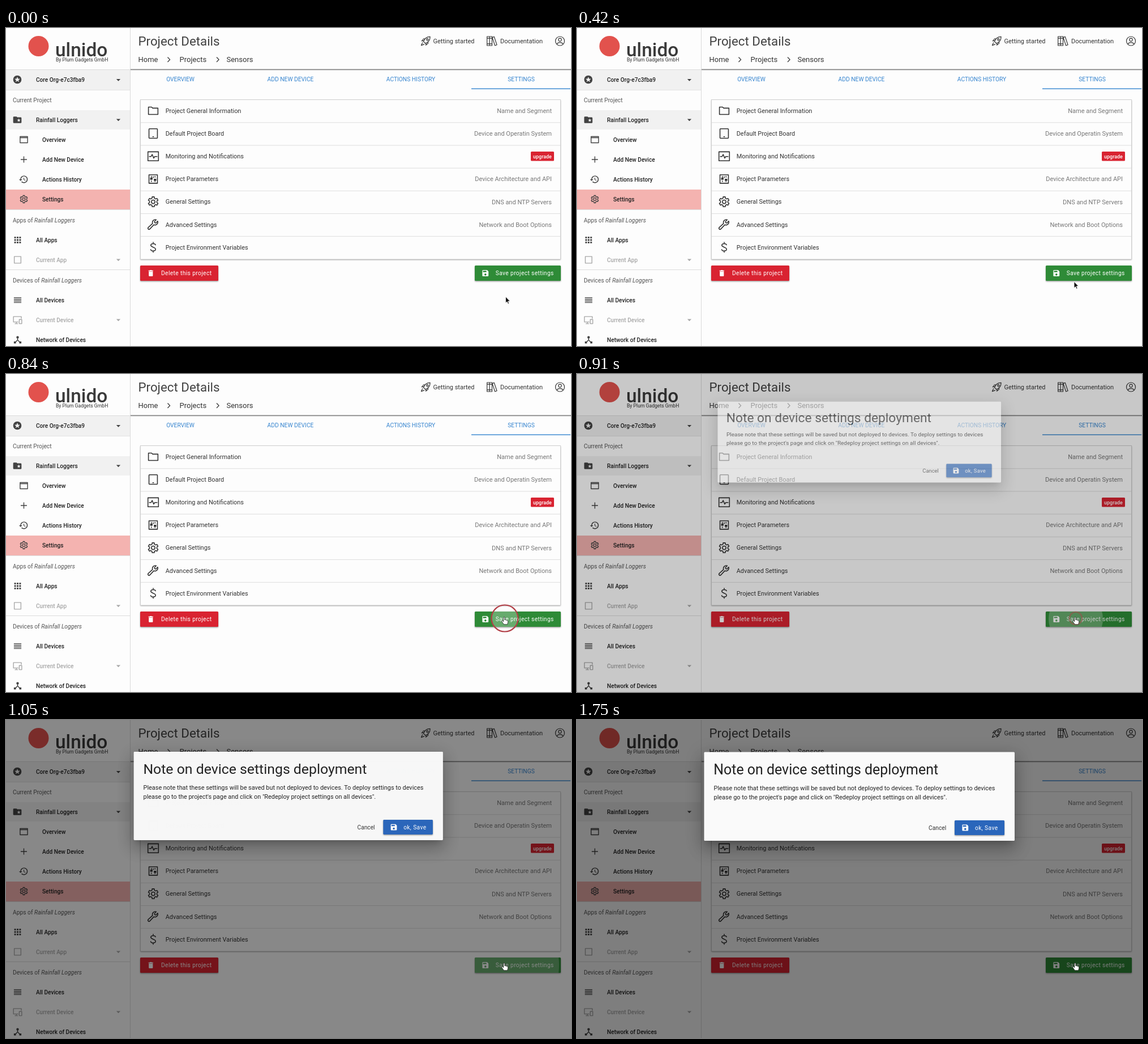
Write an HTML page that moves like this. It is 998 px wide and 561 px high and loops after 2170 ms.

```html
<!DOCTYPE html>
<html lang="en">
<head>
<meta charset="utf-8">
<title>Project settings</title>
<style>
html, body { margin: 0; width: 100%; height: 100%; overflow: hidden; background: #fdfdfd; }
svg { display: block; width: 100vw; height: 100vh; font-family: Roboto, sans-serif; }
</style>
</head>
<body>
<svg id="stage" viewBox="0 0 998 561"></svg>
<script>
const LOOP = 2170, STEP = 70, LAST = 1750;
const INK = '#424242', RED = '#d92331', GREEN = '#2e8b37', BLUE = '#2a66bb';

// y is the middle of the capitals
const text = (x, y, size, str, fill = '#212121', attrs = '') =>
  `<text x="${x}" y="${y + size * 0.355}" font-size="${size}" fill="${fill}" ${attrs}>${str}</text>`;
const rect = (x, y, w, h, fill, attrs = '') =>
  `<rect x="${x}" y="${y}" width="${w}" height="${h}" fill="${fill}" ${attrs}/>`;
const place = (x, y, k) => `transform="translate(${x} ${y}) scale(${k}) translate(-12 -12)"`;
const solid = (x, y, k, d, fill = INK) =>
  `<path ${place(x, y, k)} d="${d}" fill="${fill}" fill-rule="evenodd"/>`;
const line = (x, y, k, d, stroke = INK, w = 1.9) =>
  `<path ${place(x, y, k)} d="${d}" fill="none" stroke="${stroke}" stroke-width="${w}" stroke-linejoin="round"/>`;
const polar = (r, a, cx = 12, cy = 12) =>
  `${(cx + r * Math.sin(a)).toFixed(2)} ${(cy - r * Math.cos(a)).toFixed(2)}`;
const ring = (cx, cy, r) => `M${cx - r} ${cy}a${r} ${r} 0 1 0 ${2 * r} 0a${r} ${r} 0 1 0 ${-2 * r} 0z`;

function star(cx, cy, r) {
  const pts = [];
  for (let i = 0; i < 10; i++) pts.push(polar(i % 2 ? r * 0.42 : r, i * Math.PI / 5, cx, cy));
  return 'M' + pts.join('L') + 'z';
}

function gear() {
  const pts = [];
  for (let i = 0; i < 6; i++) {
    const a = i * Math.PI / 3;
    pts.push(polar(7.2, a - 0.31), polar(9.6, a - 0.21), polar(9.6, a + 0.21), polar(7.2, a + 0.31));
  }
  return 'M' + pts.join('L') + 'z' + ring(12, 12, 3.4);
}

function grid() {
  let d = '';
  for (let i = 0; i < 9; i++) d += `M${4 + i % 3 * 6} ${4 + Math.floor(i / 3) * 6}h4v4h-4z`;
  return d;
}

const ICON = {
  starCircle: ring(12, 12, 10) + star(12, 12.3, 7),
  folderStar: 'M10 4H4a2 2 0 0 0-2 2v12a2 2 0 0 0 2 2h16a2 2 0 0 0 2-2V8a2 2 0 0 0-2-2h-8z' + star(15.5, 13.2, 4.6),
  drop: 'M7 10l5 5 5-5z',
  web: 'M3 4.5h18v15H3zM3 7.2h18',
  plus: 'M12 4.5v15M4.5 12h15',
  history: 'M13 3a9 9 0 0 0-9 9H1l3.9 3.9L9 12H6a7 7 0 1 1 2.06 4.94l-1.42 1.42A9 9 0 1 0 13 3zm-1 5v5l4.3 2.5.7-1.2-3.5-2.1V8z',
  gear: gear(),
  grid: grid(),
  box: 'M4 4h16v16H4z',
  list: 'M3 6h18M3 10h18M3 14h18M3 18h18',
  screens: 'M21 9V4H2v13h12M5 21h8M9 17v4M16 11h6v10h-6z',
  hub: 'M17 16l-4-4V8.8a3 3 0 1 0-2 0V12l-4 4H3v5h5v-3l4-4.2 4 4.2v3h5v-5z',
  folder: 'M3 5h6l2 2h10v12H3z',
  tablet: 'M5 3h14a1 1 0 0 1 1 1v16a1 1 0 0 1-1 1H5a1 1 0 0 1-1-1V4a1 1 0 0 1 1-1zM10.5 18h3',
  pulse: 'M2 3.5h20v17H2zM4 12.5h4l2-4 3 7 2-3h5',
  sliders: 'M4 4h16v16H4zM8.5 6.5v5M8.5 15v2.5M7 10.5h3v2H7zM15.5 6.5V9M15.5 12v5.5M14 12.5h3v2h-3zM12 7v3',
  wrench: 'M20.5 5.5a5.5 5.5 0 0 1-7.3 6.9l-7.6 8.1a2 2 0 0 1-3-3l8.2-7.5a5.5 5.5 0 0 1 6.9-7.1l-3.3 3.4.5 2.2 2.2.5z',
  dollar: 'M12 2v3M12 19v3M16.5 8.2c0-4.2-9-4.2-9 0 0 4.3 9 3 9 7.5 0 4.3-9.3 4.3-9.3 0',
  rocket: 'M7 13C9 7 14 2.5 21.5 2.5 21.5 10 17 15 11 17zM8 11l-5 1 4-5h4M13 16l-1 5 5-4v-4M5 15l-3 6.5L9 19' + ring(15.5, 8.5, 2),
  books: 'M1 2h5.5v20H1zM6.5 2H12v20H6.5zM12.5 4l4.2-1.5 6 18-4.2 1.5zM1 6h11M1 18h11',
  person: ring(12, 12, 10) + ring(12, 9.3, 3.3) + 'M5.2 18.8c2-4.8 11.6-4.8 13.6 0',
  trash: 'M6 19a2 2 0 0 0 2 2h8a2 2 0 0 0 2-2V7H6zM19 4h-3.5l-1-1h-5l-1 1H5v2h14z',
  save: 'M17 3H5a2 2 0 0 0-2 2v14a2 2 0 0 0 2 2h14a2 2 0 0 0 2-2V7zM15 9H5V5h10z' + ring(12, 16, 3)
};

const MEDIUM = 'font-weight="500"', SPACED = 'letter-spacing=".37"';
const rule = (x, y, w, fill = '#dcdcdc', h = 1) => rect(x, y, w, h, fill);

function sidebar() {
  const item = (x, y, str, fill) => text(x, y, 10.15, str, fill, MEDIUM);
  const label = (y, str) => text(12, y, 10.28, str, '#555');
  const pale = '#a8a8a8', k = 0.733, group = 'Rainfall Loggers';
  return rect(0, 74, 219, 35, '#f1f1f1') + rect(0, 145, 219, 34, '#f1f1f1') +
    rect(0, 285, 219, 35, '#f4b3b0') +
    rule(0, 73, 219) + rule(0, 109, 219, '#e2e2e2') + rule(0, 320, 219) + rule(0, 426, 219) +
    rect(219, 0, 1, 561, '#dadada') +
    `<circle cx="57.5" cy="32" r="18" fill="#e2524d"/>` +
    text(87, 38.5, 33.5, 'ulnido', '#3a3a3a', MEDIUM) +
    text(88, 56, 8.65, 'By Plum Gadgets GmbH', '#333') +
    solid(20, 91, k, ICON.starCircle) + item(53, 91, 'Core Org-e7c3fba9') + solid(198.5, 91.5, k, ICON.drop) +
    label(127, 'Current Project') +
    solid(20, 162, k, ICON.folderStar) + item(53, 162, group) + solid(198.5, 162, k, ICON.drop) +
    line(31.5, 197, k, ICON.web) + item(64, 197, 'Overview') +
    line(31.5, 232, k, ICON.plus) + item(64, 232, 'Add New Device') +
    solid(31, 267, k, ICON.history) + item(64, 267, 'Actions History') +
    line(31.5, 302, 0.69, ICON.gear) + item(64, 302, 'Settings') +
    label(339, `Apps of <tspan font-style="italic">${group}</tspan>`) +
    solid(20.5, 374, k, ICON.grid) + item(53, 374, 'All Apps') +
    line(20.5, 409, k, ICON.box, pale) + item(53, 409, 'Current App', pale) + solid(198.5, 409, k, ICON.drop, pale) +
    label(445, `Devices of <tspan font-style="italic">${group}</tspan>`) +
    line(20.5, 480, k, ICON.list) + item(53, 480, 'All Devices') +
    line(20.5, 515, k, ICON.screens, pale) + item(53, 515, 'Current Device', pale) + solid(198.5, 515, k, ICON.drop, pale) +
    solid(20.5, 550, k, ICON.hub) + item(53, 550, 'Network of Devices');
}

function header() {
  const tab = (x, str) => text(x, 90.5, 10.26, str, '#3584cf', 'text-anchor="middle"');
  const chevron = x => `<path d="M${x - 2} 51.5l4 4.2-4 4.2" fill="none" stroke="#444" stroke-width="1.4"/>`;
  return text(233.5, 23, 22.3, 'Project Details', INK) +
    text(233.5, 55, 13, 'Home', '#333') + chevron(287.5) +
    text(306.5, 55, 13, 'Projects', '#333') + chevron(374) +
    text(389.5, 55, 13, 'Sensors', '#333') +
    line(741.5, 23, 0.8, ICON.rocket, '#333', 1.5) + text(754.5, 23, 11, 'Getting started', '#333') +
    line(858.5, 23, 0.8, ICON.books, '#333', 1.5) + text(873, 23, 11, 'Documentation', '#333') +
    line(978.5, 23, 0.8, ICON.person, '#333', 1.5) +
    rule(220, 72.5, 778, '#858585', 1.5) + rule(220, 74, 778, '#e0e0e0') +
    tab(308, 'OVERVIEW') + tab(502.5, 'ADD NEW DEVICE') + tab(715, 'ACTIONS HISTORY') + tab(910, 'SETTINGS') +
    rule(822, 106.5, 175, '#3584cf', 1.4);
}

function card() {
  const rows = [
    ['folder', 'Project General Information', 'Name and Segment'],
    ['tablet', 'Default Project Board', 'Device and Operatin System'],
    ['pulse', 'Monitoring and Notifications', ''],
    ['sliders', 'Project Parameters', 'Device Architecture and API'],
    ['gear', 'General Settings', 'DNS and NTP Servers'],
    ['wrench', 'Advanced Settings', 'Network and Boot Options'],
    ['dollar', 'Project Environment Variables', '']
  ];
  let out = rect(237.5, 127.5, 742, 281.5, '#000', 'opacity=".4" filter="url(#soft)"') +
    rect(237.5, 126.5, 742, 281.5, '#fdfdfd', 'stroke="#c8c8c8" stroke-width=".8"');
  rows.forEach(([icon, left, right], i) => {
    const y = 146 + i * 40.15;
    if (i) out += rule(238, y - 19.8, 741, '#dedede');
    out += line(260, y, 0.93, ICON[icon], '#333', 1.7) + text(281.7, y, 10.93, left, '#333') +
      text(964, y, 11, right, '#777', 'text-anchor="end"');
  });
  return out + rect(927, 218, 41, 16.5, RED, 'rx="1.5"') +
    text(947.5, 226.5, 8.95, 'upgrade', '#fff', MEDIUM + ' text-anchor="middle"');
}

const button = (x, y, w, h, fill, icon, str, gap) =>
  rect(x, y + 1.2, w, h, '#000', 'rx="1.5" opacity=".4" filter="url(#soft)"') +
  rect(x, y, w, h, fill, 'rx="1.5"') +
  solid(x + 18.8, y + h / 2, 0.6, ICON[icon], '#fff') +
  text(x + gap, y + h / 2, 10.26, str, '#fff', SPACED);

function dialog() {
  const shade = (dy, grow, alpha, id) =>
    rect(224.5 - grow, 56.5 - grow + dy, 548.5 + 2 * grow, 156.5 + 2 * grow, '#000', `opacity="${alpha}" filter="url(#${id})"`);
  return shade(17, 2, 0.14, 'wide') + shade(7, 6, 0.14, 'wide') + shade(8, -5, 0.2, 'mid') +
    rect(224.5, 56.5, 548.5, 156.5, '#fafafa', 'rx="1.5"') +
    text(241.3, 87, 24.93, 'Note on device settings deployment') +
    text(241.5, 120, 10.93, 'Please note that these settings will be saved but not deployed to devices. To deploy settings to devices') +
    text(241.5, 136, 10.93, 'please go to the project\'s page and click on "Redeploy project settings on all devices".') +
    text(621, 190, 10.26, 'Cancel', '#333') +
    button(667, 177, 88, 26, BLUE, 'save', 'ok, Save', 36);
}

const blur = (id, s) =>
  `<filter id="${id}" x="-20%" y="-60%" width="140%" height="220%"><feGaussianBlur stdDeviation="${s}"/></filter>`;

const stage = document.getElementById('stage');
stage.innerHTML =
  `<defs>${blur('soft', 1.3)}${blur('mid', 5.5)}${blur('wide', 15)}
    <clipPath id="saveClip">${rect(828, 419, 152, 27, '#000', 'rx="1.5"')}</clipPath></defs>` +
  rect(0, 0, 998, 561, '#fdfdfd') + sidebar() + header() + card() +
  button(237, 419, 138, 27, RED, 'trash', 'Delete this project', 37) +
  button(828, 419, 152, 27, GREEN, 'save', 'Save project settings', 36.7) +
  `<g clip-path="url(#saveClip)"><circle id="ripple" cx="881" cy="432" fill="#fff"/></g>
  <rect id="veil" width="998" height="561"/>
  <g id="dialog">${dialog()}</g>
  <circle id="ring" cx="881" cy="431" fill="none" stroke="#b23f47" stroke-width="2.2"/>
  <path id="arrow" d="M0 0V11.2L2.6 8.8 4.3 12.8 6.1 12 4.4 8.1H7.9z" fill="#111" stroke="#fff" stroke-width=".8"/>
  <path id="hand" d="M-1.2 .8c0-1.5 2.2-1.5 2.2 0V5c.4-.7 1.8-.6 2 .3.5-.6 1.7-.4 1.9.5.7-.4 1.7 0 1.7.9v2.6c0 1.3-1 2-1 3.5H-.8C-1 11.2-3.6 9-4.2 7.4c-.4-1.2.9-1.8 1.7-.9l1.3 1.3z"
    fill="#fff" stroke="#222" stroke-width=".8"/>`;

const part = {};
for (const id of ['ripple', 'veil', 'dialog', 'ring', 'arrow', 'hand']) part[id] = document.getElementById(id);
const set = (id, attrs) => {
  for (const name in attrs) part[id].setAttribute(name, attrs[name]);
};
const clamp = v => Math.min(1, Math.max(0, v));

const path = [[70, 882.5, 474], [420, 878, 447.5], [630, 880, 429]];
function pointer(t) {
  const [a, b] = t < path[1][0] ? path : path.slice(1);
  const u = clamp((t - a[0]) / (b[0] - a[0]));
  return [a[1] + (b[1] - a[1]) * u, a[2] + (b[2] - a[2]) * u];
}

function draw(now) {
  const t = Math.min(LAST, Math.floor(now % LOOP / STEP) * STEP);

  const [x, y] = pointer(t), over = y < 446;
  set('arrow', { transform: `translate(${x} ${y})`, opacity: over ? 0 : 1 });
  set('hand', { transform: `translate(${x} ${y})`, opacity: over ? 1 : 0 });

  const pressed = t >= 840, shrink = clamp((t - 840) / 133);
  set('ring', { r: 23.5 * (1 - shrink), opacity: pressed ? 1 - shrink : 0 });
  set('ripple', { r: Math.max(0, (t - 770) / STEP * 24), opacity: 0.27 * (1 - clamp((t - 1050) / 350)) });

  const u = clamp((t - 840) / 290), p = 1 - (1 - u) ** 3, k = 0.8 + 0.2 * p;
  set('veil', { opacity: 0.5 * (1 - (1 - u) ** 2) });
  set('dialog', {
    opacity: p,
    transform: `translate(498.75 ${134.75 - 33.66 * (1 - p)}) scale(${k}) translate(-498.75 -134.75)`
  });
}

const start = performance.now();
function tick() {
  draw(performance.now() - start);
  requestAnimationFrame(tick);
}
tick();
</script>
</body>
</html>
```
